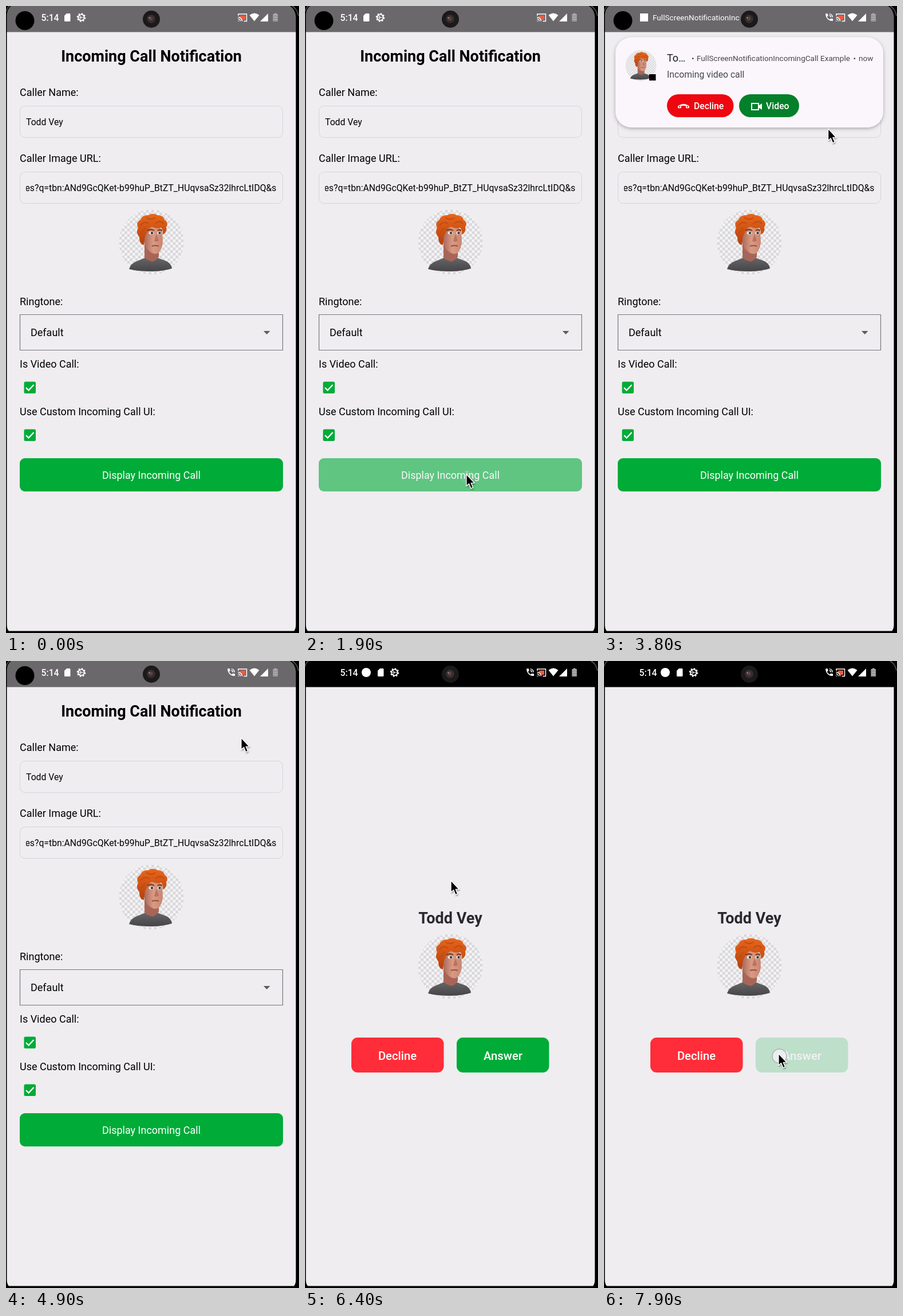
Write an HTML page that moves like this. It is 512x1094 px and loops after 8000 ms.

```html
<!DOCTYPE html>
<html lang="en">
<head>
<meta charset="utf-8">
<title>Incoming call demo</title>
<style>
html, body { margin: 0; width: 100%; height: 100%; overflow: hidden; background: #000; }
svg { display: block; }
text { font: 18px Roboto, Arial, sans-serif; white-space: pre; }
.title { font-size: 27px; font-weight: 700; text-anchor: middle; }
.input { font-size: 15.75px; }
.meta { font-size: 13.6px; }
.mid { text-anchor: middle; }
.chip { font-size: 15.75px; font-weight: 500; fill: #fff; }
.big { font-size: 20.25px; font-weight: 500; fill: #fff; text-anchor: middle; }
.field { fill: none; stroke: #d7d5d9; }
</style>
</head>
<body>
<svg width="512" height="1094" viewBox="0 0 512 1094">
  <defs>
    <pattern id="checks" width="9.4" height="9.4" patternUnits="userSpaceOnUse">
      <path fill="#f4f3f5" d="M0 0h9.400v9.400h-9.400z"/>
      <path fill="#d9d7da" d="M0 0h4.700v4.700h-4.700zM4.700 4.700h4.700v4.700h-4.700z"/>
    </pattern>
    <linearGradient id="skin"><stop stop-color="#a9685a"/><stop offset=".5" stop-color="#d99a83"/><stop offset="1" stop-color="#c98672"/></linearGradient>
    <linearGradient id="hair" x2="0" y2="1"><stop stop-color="#e8661c"/><stop offset="1" stop-color="#b5400c"/></linearGradient>
    <linearGradient id="shirt" x2="0" y2="1"><stop stop-color="#666567"/><stop offset="1" stop-color="#454446"/></linearGradient>
    <filter id="shadow" x="-10%" y="-15%" width="120%" height="140%">
      <feDropShadow dx="0" dy="2" stdDeviation="3" flood-opacity=".3"/>
    </filter>
    <filter id="soft" x="-50%" y="-30%" width="220%" height="180%">
      <feDropShadow dx="1" dy="2" stdDeviation="1.2" flood-opacity=".35"/>
    </filter>
    <clipPath id="urlBox"><path d="M35 295h440v44H35z"/></clipPath>

    <g id="avatar">
      <circle r="56.500" fill="url(#checks)"/>
      <path fill="url(#shirt)" d="M-39 47Q-36 37-25 33L-10 27Q1 36 10 27L26 33Q35 37 36 46Q20 51 0 51Q-25 51-39 47Z"/>
      <path fill="#a86557" d="M-12 0H13V26Q5 34 2 34Q-7 32-12 27Z"/>
      <path fill="url(#skin)" d="M-13-24Q4-34 19-22L20 0Q19 13 12 19Q6 23-2 17Q-13 9-13-5Z"/>
      <ellipse cx="-16" cy="-8" rx="4" ry="7" fill="#c17964"/>
      <path fill="url(#hair)" d="M-13 5Q-21 4-21-9Q-28-17-23-25Q-28-34-19-39Q-16-48-5-47Q3-52 11-47Q21-47 23-39Q31-34 26-26Q28-17 20-13Q21-22 17-25Q7-23 1-27Q-7-24-8-16Q-12-12-12-3Z"/>
      <path fill="none" stroke="#c04c10" stroke-width="2" d="M-19-29Q-12-38-4-32M-9-43Q0-37 7-43M7-32Q15-40 22-32M-19-15Q-14-19-11-25"/>
      <path fill="none" stroke="#8d3e1c" stroke-width="2.500" d="M-7-20Q-1-24 5-20M11-20Q15-23 19-20"/>
      <g fill="#f1e9e5"><ellipse cx="0" cy="-16" rx="4.300" ry="2.800"/><ellipse cx="14" cy="-16" rx="3.600" ry="2.800"/></g>
      <g fill="#38423f"><circle cx="1" cy="-16" r="2.200"/><circle cx="14.500" cy="-16" r="2.200"/></g>
      <path fill="#bd715f" d="M9-14L13-3Q10 1 5-2Z"/>
      <path fill="none" stroke="#98503f" stroke-width="2" d="M1 7Q7 5 13 7"/>
    </g>

    <g id="check">
      <rect width="20.500" height="20.500" rx="2.500" fill="#00ab38"/>
      <path fill="none" stroke="#fff" stroke-width="2.300" d="M3.500 10.500L8 15L17 5.500"/>
    </g>
    <path id="sd" fill="#fff" d="M106 13h5q1.500 0 1.500 1.500v11q0 1.500-1.500 1.500h-7.500q-1.500 0-1.500-1.500v-8.500z"/>
    <g id="gear" fill="none" stroke="#fff" transform="translate(131.500 20)">
      <circle r="5.300" stroke-width="1.800"/>
      <circle r="6.800" stroke-width="2" stroke-dasharray="2.670"/>
      <path stroke-width="1.200" d="M-5 0H5M0 0L-3-4M0 0L-3 4"/>
    </g>
    <text id="clock" class="chip" x="61.500" y="26">5:14</text>
  </defs>

  <path fill="#efedf0" d="M0 0h512v1094H0z"/>

  <g id="form">
    <path fill="#6b686c" d="M0 0h512v45.500H0z"/>
    <circle cx="33" cy="25.500" r="16.500"/>
    <text class="title" x="254" y="97">Incoming Call Notification</text>
    <text x="24" y="157">Caller Name:</text>
    <rect class="field" x="24.500" y="174.500" width="459" height="55" rx="9"/>
    <text class="input" x="35" y="208">Todd Vey</text>
    <text x="24" y="272">Caller Image URL:</text>
    <rect class="field" x="24.500" y="289.500" width="459" height="55" rx="9"/>
    <g clip-path="url(#urlBox)"><text class="input" x="472.500" y="322.500" text-anchor="end">es?q=tbn:ANd9GcQKet-b99huP_BtZT_HUqvsaSz32lhrcLtIDQ&amp;s</text></g>
    <use href="#avatar" x="254" y="412"/>
    <text x="24" y="521.500">Ringtone:</text>
    <path fill="none" stroke="#79777b" stroke-width="1.200" d="M24.500 538.500h459v62h-459z"/>
    <text x="43" y="576">Default</text>
    <path fill="#5d5c5f" d="M450 567h11.500l-5.750 6z"/>
    <text x="24" y="631">Is Video Call:</text>
    <use href="#check" x="31.500" y="655.500"/>
    <text x="24" y="714">Use Custom Incoming Call UI:</text>
    <use href="#check" x="31.500" y="738.500"/>
    <g id="display">
      <rect x="24" y="789" width="460" height="58" rx="9" fill="#00ab38"/>
      <text class="mid" x="254" y="825" fill="#fff">Display Incoming Call</text>
    </g>
    <g id="idle"><use href="#clock"/><use href="#sd"/><use href="#gear"/></g>
    <g id="ticker" fill="#fff">
      <path d="M63 13h14v14H63z"/>
      <text class="meta" x="85" y="25">FullScreenNotificationInc</text>
    </g>
    <g id="banner">
      <rect x="20" y="54.500" width="468" height="157.500" rx="28" fill="#faf6fc" filter="url(#shadow)"/>
      <use href="#avatar" transform="translate(64.500 104) scale(.478)"/>
      <path d="M79 119h11.500v11H79z"/>
      <text x="110" y="97" fill="#1d1b20">To…</text>
      <g fill="#48454c">
        <text class="meta" x="153" y="96">•</text>
        <text class="meta" x="162" y="96">FullScreenNotificationIncomingCall Example</text>
        <text class="meta" x="435.500" y="96">•</text>
        <text class="meta" x="445" y="96">now</text>
        <text class="input" x="110" y="125">Incoming video call</text>
      </g>
      <rect x="110" y="154" width="116.500" height="40" rx="20" fill="#ee0710"/>
      <rect x="236" y="154" width="105" height="40" rx="20" fill="#04802a"/>
      <path fill="none" stroke="#fff" stroke-width="1.700" d="M130 175q9-7 18 0v2.500h-4v-3.500q-5-1.500-10 0v3.500h-4z"/>
      <path fill="none" stroke="#fff" stroke-width="2" d="M258 170h12v11h-12z"/>
      <path fill="#fff" d="M270 174l6-4v11l-6-4z"/>
      <text class="chip" x="157" y="180">Decline</text>
      <text class="chip" x="283" y="180">Video</text>
    </g>
  </g>

  <g id="call">
    <path fill="#efedf0" d="M0 45h512v1049H0z"/>
    <path d="M0 0h512v45.500H0z"/>
    <use href="#clock"/>
    <circle cx="107" cy="20" r="8" fill="#fff"/>
    <use href="#sd" x="25"/><use href="#gear" x="25"/>
    <text class="title" x="254" y="458" fill="#2a282d">Todd Vey</text>
    <use href="#avatar" x="254" y="533"/>
    <rect x="81" y="657" width="161.500" height="61" rx="11" fill="#ff2d39"/>
    <text class="big" x="161.500" y="695.500">Decline</text>
    <g id="answer">
      <rect x="265" y="657" width="161.500" height="61" rx="11" fill="#00ab38"/>
      <text class="big" x="346" y="695.500">Answer</text>
    </g>
  </g>

  <!-- status icons on the right -->
  <g id="ringing" transform="translate(385 11) scale(.72)">
    <path fill="#fff" d="M6.600 10.800c1.400 2.800 3.800 5.100 6.600 6.600l2.200-2.200c.3-.3.7-.4 1-.2 1.100.4 2.300.6 3.600.6.6 0 1 .4 1 1V20c0 .6-.4 1-1 1C10.600 21 3 13.400 3 4c0-.6.5-1 1-1h3.500c.6 0 1 .4 1 1 0 1.200.2 2.500.6 3.600.1.3 0 .7-.2 1z"/>
    <path fill="none" stroke="#fff" stroke-width="2" d="M12 8a4 4 0 0 1 4 4M12 4a8 8 0 0 1 8 8"/>
  </g>
  <path fill="#ee5a41" d="M409 16.500h9v7.500h-5l-4-4z"/>
  <path fill="none" stroke="#fff" stroke-width="1.500" d="M406 17v-3h14.500v12.500h-5M405.500 19.500a7 7 0 0 1 7 7M405.500 22.500a4 4 0 0 1 4 4"/>
  <path fill="#fff" d="M405.500 25l2 2h-2zM425.500 16q8.500-7 17 0l-8.500 10.500zM458 13v14h-14z"/>
  <path fill="#aaa8ab" d="M466.500 14h2.500v-1.500h3.500V14h2.500v13h-8.500z"/>
  <path stroke="#858386" d="M466.500 17.500h8.500M466.500 21.500h8.500M466.500 25.500h8.500"/>

  <!-- camera and phone frame -->
  <circle cx="254" cy="23" r="15" fill="#1b191a"/>
  <circle cx="253.500" cy="22.500" r="7.500" fill="#352d2f"/>
  <circle cx="253" cy="22" r="3.500" fill="#57413f"/>
  <circle cx="250.500" cy="20.500" r="1.200" fill="#a08685"/>
  <path fill-rule="evenodd" d="M0 0h512v1094H0zM9 0Q3 4 1.500 14V1080Q1.500 1087 5 1090.500H503Q506.500 1087 506.500 1080V18Q505 5 496 0z"/>
  <path fill="none" stroke="#59575a" stroke-width="1.500" d="M500 0Q509 5 511 17M6 0Q1 4 0 10"/>

  <circle id="tap" r="12.500" fill="#f2f1f5" stroke="#a9a9b8" stroke-width="1.500"/>
  <path id="cursor" filter="url(#soft)" stroke="#fff" stroke-width="1.300" stroke-linejoin="round" d="M0 0V20.500L4.600 16.500L8 24.800L11.600 23.200L8.200 15.300H14.200Z"/>
</svg>
<script>
const LOOP = 8000, STEP = 100;
const el = id => document.getElementById(id);

// keys: [time, ...values], linear between neighbours
function at(t, keys) {
  const i = keys.findIndex(k => k[0] > t);
  if (i < 0) return keys[keys.length - 1].slice(1);
  if (i === 0) return keys[0].slice(1);
  const a = keys[i - 1], b = keys[i], p = (t - a[0]) / (b[0] - a[0]);
  return a.slice(1).map((v, j) => v + (b[j + 1] - v) * p);
}

const cursorPath = [
  [500, 305, 1023], [1000, 295, 853], [1100, 293, 818], [1600, 282, 817],
  [2800, 282, 817], [3300, 325, 560], [3900, 405, 145], [4200, 411, 134],
  [6100, 411, 134], [6400, 255, 383], [6900, 312, 678], [7300, 300, 685], [7600, 305, 685]
];
const displayAlpha = [[1600, 1], [1700, .6], [1800, .2], [1900, .6], [2000, 1]];
const answerAlpha = [[7700, 1], [7800, .6], [7900, .2]];
const bannerShow = [[2000, 0], [2100, .3], [2200, .75], [2300, .95], [2400, 1], [4500, 1], [4800, 0]];
const tapAlpha = [[1600, 0], [1700, .85], [1800, .85], [1900, .08], [2000, 0], [7700, 0], [7800, .85]];

const show = (id, on) => el(id).style.display = on ? '' : 'none';
const fade = (id, v) => el(id).setAttribute('opacity', v);

function draw(t) {
  const [x, y] = at(t, cursorPath), [banner] = at(t, bannerShow);
  const inCall = t >= 5000;
  show('form', !inCall);
  show('call', inCall);
  show('ringing', t >= 2100);
  show('ticker', banner > 0);
  show('idle', banner === 0);
  fade('display', at(t, displayAlpha)[0]);
  fade('answer', at(t, answerAlpha)[0]);
  fade('banner', banner);
  el('banner').setAttribute('transform', `translate(0 ${-40 * (1 - banner)})`);
  show('cursor', t >= 500);
  el('cursor').setAttribute('transform', `translate(${x} ${y})`);
  fade('tap', at(t, tapAlpha)[0]);
  el('tap').setAttribute('transform', `translate(${x + 1.5} ${y + 4.5})`);
}

function tick() {
  draw(Math.floor(performance.now() % LOOP / STEP) * STEP);
  requestAnimationFrame(tick);
}
tick();
</script>
</body>
</html>
```
